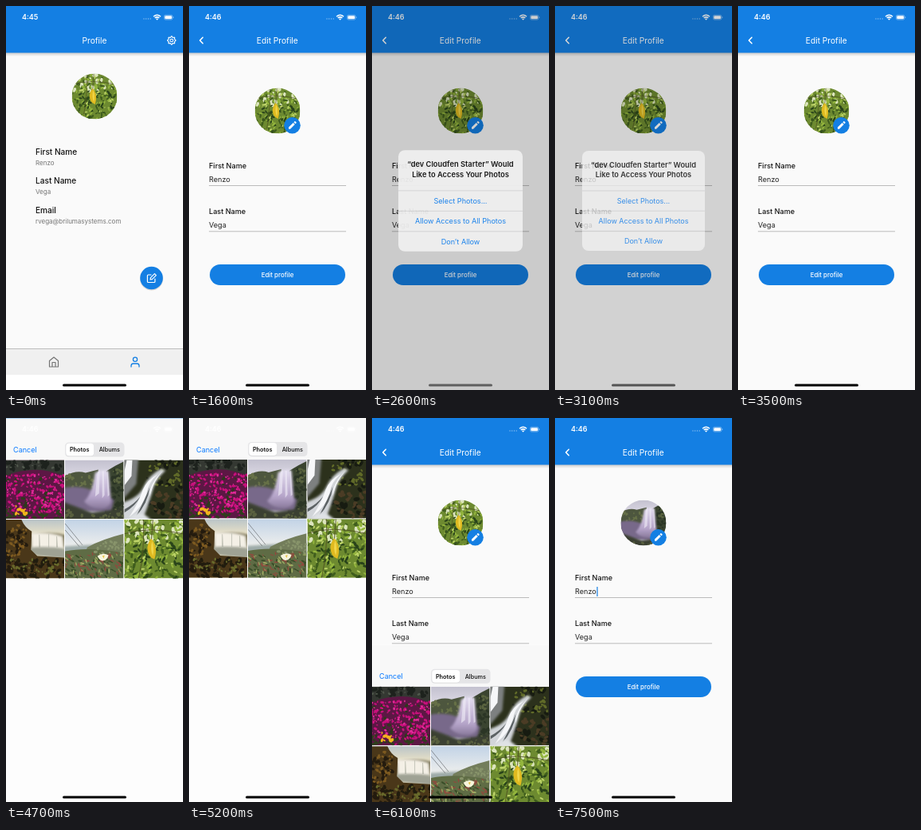
Write an HTML page that moves like this. It is 222 by 480 pixels and loops after 8000 ms.

```html
<!DOCTYPE html>
<html lang="en">
<head>
<meta charset="utf-8">
<title>Edit profile</title>
<style>
html, body { margin: 0; width: 100%; height: 100%; overflow: hidden; background: #fafafa; }
svg.stage { display: block; width: 100vw; height: 100vh; }
text { font-family: Inter, Roboto, "Open Sans", sans-serif; fill: #111; }
.mid { text-anchor: middle; }
.title { font-size: 10.2px; fill: #fff; }
.big { font-size: 10.1px; font-weight: 500; }
.sub { font-size: 8px; fill: #757575; }
.label { font-size: 9.1px; font-weight: 500; }
.value { font-size: 9.1px; fill: #222; }
.action { font-size: 7.9px; font-weight: 500; fill: #fff; }
.ask { font-size: 9.2px; font-weight: 600; }
.link { font-size: 9px; fill: #127fee; }
.tab { font-size: 7.3px; font-weight: 500; }
.line { fill: none; stroke: #fff; stroke-linecap: round; stroke-linejoin: round; }
</style>
</head>
<body>
<svg class="stage" viewBox="0 0 222 480">
  <defs>
    <linearGradient id="shade" x2="0" y2="1">
      <stop stop-color="#000" stop-opacity=".2"/><stop offset="1" stop-color="#000" stop-opacity="0"/>
    </linearGradient>
    <linearGradient id="skyGrey" x2="0" y2="1">
      <stop stop-color="#c3c1cf"/><stop offset=".25" stop-color="#d9d6e2"/>
    </linearGradient>
    <linearGradient id="skyGold" x2="0" y2="1">
      <stop stop-color="#b9c4c8"/><stop offset=".3" stop-color="#f1e6c6"/>
    </linearGradient>
    <linearGradient id="skyBlue" x2="0" y2="1">
      <stop stop-color="#c2d3e6"/><stop offset=".45" stop-color="#edeeed"/>
    </linearGradient>
    <linearGradient id="mist" x2="0" y2="1">
      <stop stop-color="#e4def0"/><stop offset=".7" stop-color="#b5a4c9"/><stop offset="1" stop-color="#8a7a9c"/>
    </linearGradient>
    <filter id="soft"><feGaussianBlur stdDeviation="1.4"/></filter>
    <clipPath id="round"><circle cx="28.5" cy="28.5" r="28.5"/></clipPath>
    <g id="photos"></g>
    <g id="bar">
      <rect width="222" height="480" fill="#fafafa"/>
      <rect y="58" width="222" height="5" fill="url(#shade)"/>
      <rect width="222" height="58.5" fill="#147fe3"/>
    </g>
  </defs>

  <g id="profile">
    <use href="#bar"/>
    <text class="title mid" x="111" y="46.5">Profile</text>
    <g class="line" transform="translate(207.7 43)" stroke-width="1.1">
      <path id="gear"/><circle r="1.8"/>
    </g>
    <g transform="translate(82.5 84.5)" clip-path="url(#round)"><use href="#leaves" width="57" height="57"/></g>
    <text class="big" x="37" y="185.5">First Name</text>
    <text class="sub" x="37" y="198.8">Renzo</text>
    <text class="big" x="37" y="222">Last Name</text>
    <text class="sub" x="37" y="235.3">Vega</text>
    <text class="big" x="37" y="258.5">Email</text>
    <text class="sub" x="37" y="271.8">rvega@brilumasystems.com</text>
    <circle cx="182.5" cy="341" r="14.5" fill="#000" opacity=".15"/>
    <circle cx="182.5" cy="340" r="14.3" fill="#147fe3"/>
    <path class="line" stroke-width="1.2" d="M182 336h-3.6q-1 0-1 1v7.5q0 1 1 1h7.5q1 0 1-1V341M181 342l.4-2.3 5-5 1.9 1.9-5 5z"/>
    <rect y="428" width="222" height="33" fill="#f0f0f0"/>
    <rect y="428" width="222" height="1" fill="#bdbdbd"/>
    <rect y="461" width="222" height="19" fill="#fff"/>
    <path class="line" style="stroke:#747474" stroke-width="1.2" d="M54.5 443.5l5.5-4.5 5.5 4.5v7.5h-11zM58 451v-5.5h4v5.5"/>
    <path class="line" style="stroke:#147fe3" stroke-width="1.3" d="M157 451v-1.2q0-2.8 2.8-2.8h4.4q2.8 0 2.8 2.8v1.2M159.4 441.8a2.6 2.6 0 1 0 5.2 0a2.6 2.6 0 1 0-5.2 0"/>
  </g>

  <g id="edit">
    <use href="#bar"/>
    <text class="title mid" x="110.8" y="46.5">Edit Profile</text>
    <path class="line" stroke-width="1.6" d="M17.3 39.3l-3.6 3.7 3.6 3.7"/>
    <g transform="translate(82.5 102.5)" clip-path="url(#round)"><use id="face" href="#leaves" width="57" height="57"/></g>
    <circle cx="129.5" cy="149.3" r="10.3" fill="#147fe3"/>
    <path fill="#fff" d="M125 153.7v-2.1l5.7-5.7 2.1 2.1-5.7 5.7zM131.4 145.2l1-1q.5-.4 1 0l1.1 1.1q.4.5 0 1l-1 1z"/>
    <text class="label" x="25" y="203.2">First Name</text>
    <text class="value" x="25" y="220.3">Renzo</text>
    <rect id="caret" x="52.4" y="211" width="1.2" height="12" fill="#147fe3"/>
    <rect x="25" y="224" width="172" height="1" fill="#bcbcbc"/>
    <text class="label" x="25" y="260.3">Last Name</text>
    <text class="value" x="25" y="277.3">Vega</text>
    <rect x="25" y="281.3" width="172" height="1" fill="#bcbcbc"/>
    <rect x="26" y="323" width="170" height="26" rx="13" fill="#147fe3"/>
    <text class="action mid" x="111" y="338.8">Edit profile</text>
  </g>

  <g id="sheet">
    <rect width="222" height="480" fill="#fdfdfd"/>
    <rect width="222" height="52" fill="#f8f8f8"/>
    <text x="9" y="42.6" style="font-size:9.1px;fill:#0a7aff">Cancel</text>
    <rect x="74" y="30" width="74.5" height="18" rx="4.5" fill="#e5e5e7"/>
    <rect x="75.2" y="31.5" width="35" height="16" rx="4" fill="#000" opacity=".1"/>
    <rect x="75.2" y="31.1" width="35" height="15.8" rx="4" fill="#fff"/>
    <text class="tab mid" x="92.2" y="41.7" style="font-weight:600">Photos</text>
    <text class="tab mid" x="129.8" y="41.7">Albums</text>
    <g id="grid"></g>
  </g>

  <g id="status">
    <text id="clock" x="20" y="17.3" style="font-size:9px;font-weight:600;fill:#fff"></text>
    <path class="line" stroke-width="1.3" stroke-dasharray="0 2.7" opacity=".55" d="M173 16h8.2"/>
    <path class="line" stroke-width="1.5" style="stroke-linecap:butt" d="M185 13.2q4.5-3.9 9 0M186.7 15q2.8-2.3 5.6 0"/>
    <path fill="#fff" d="M187.9 16.1q1.6-1.2 3.2 0l-1.6 1.7z"/>
    <rect x="198.4" y="11.3" width="10.4" height="5.8" rx="1.7" fill="none" stroke="#fff" stroke-width=".6" opacity=".6"/>
    <rect x="199.3" y="12.2" width="8.6" height="4" rx="1" fill="#fff"/>
    <rect x="209.4" y="13.2" width=".8" height="2" rx=".4" fill="#fff" opacity=".6"/>
  </g>

  <rect id="dim" width="222" height="480"/>
  <g id="alert">
    <rect x="34" y="181" width="154" height="125" rx="8" fill="#f0f0f0"/>
    <text class="ask mid" x="111" y="202">“dev Cloudfen Starter” Would</text>
    <text class="ask mid" x="111" y="214.3">Like to Access Your Photos</text>
    <path d="M34 231h154M34 256.2h154M34 281.4h154" stroke="#3c3c43" stroke-opacity=".25" stroke-width=".6"/>
    <text class="link mid" x="111" y="246.8">Select Photos...</text>
    <text class="link mid" x="111" y="271.9">Allow Access to All Photos</text>
    <text class="link mid" x="111" y="297.2">Don’t Allow</text>
  </g>
  <rect id="home" x="71" y="472.5" width="80" height="3" rx="1.5"/>
</svg>

<script>
const $ = id => document.getElementById(id);
const LOOP = 8000, STEP = 100;

let seed = 7;
const rnd = (a, b) => {
  seed = (seed * 16807) % 2147483647;
  return a + (b - a) * seed / 2147483647;
};

const shape = (fill, d, extra = '') => `<path fill="${fill}" d="${d}" ${extra}/>`;
const soft = (fill, d) => shape(fill, d, 'filter="url(#soft)"');
const base = fill => `<rect width="74" height="74" fill="${fill}"/>`;

// Scattered ovals in one colour, inside a box
function specks(fill, n, x0, y0, x1, y1, size, flat = 0.6, turn = 180) {
  let d = '';
  for (let i = 0; i < n; i++) {
    const a = rnd(size * 0.4, size), b = a * flat, rot = rnd(0, turn);
    const dx = 2 * a * Math.cos(rot * Math.PI / 180), dy = 2 * a * Math.sin(rot * Math.PI / 180);
    const arc = s => `a${a.toFixed(1)} ${b.toFixed(1)} ${rot.toFixed(0)} 1 0 ${(s * dx).toFixed(2)} ${(s * dy).toFixed(2)}`;
    d += `M${(rnd(x0, x1) - dx / 2).toFixed(1)} ${(rnd(y0, y1) - dy / 2).toFixed(1)}${arc(1)}${arc(-1)}`;
  }
  return shape(fill, d);
}

const photos = {
  flowers: base('#5c1744')
    + shape('#343832', 'M0 0H74V20Q50 10 28 13Q12 14 0 20z')
    + specks('#1d221d', 26, 0, 0, 74, 13, 4)
    + specks('#525a4e', 12, 0, 0, 60, 10, 2)
    + specks('#2d3a1c', 50, 0, 18, 74, 74, 3)
    + specks('#c8107c', 130, 0, 18, 74, 66, 2.6)
    + specks('#e32b9b', 80, 0, 18, 74, 64, 1.8)
    + specks('#2f3d1d', 26, 0, 62, 74, 74, 3)
    + specks('#c8107c', 14, 26, 60, 74, 74, 2.2)
    + specks('#f2b21d', 9, 12, 58, 27, 68, 3.2),

  falls: base('url(#skyGrey)')
    + shape('#4d563e', 'M0 20Q14 12 26 16L42 12V50H0z')
    + shape('#3a4430', 'M52 14L64 7 74 2V74H50z')
    + specks('#667047', 24, 0, 19, 36, 34, 3)
    + specks('#2b3525', 30, 58, 12, 74, 64, 4)
    + specks('#59633f', 14, 60, 10, 74, 30, 2.5)
    + soft('#78698a', 'M-4 36Q18 30 38 40L62 50 58 66 20 64-4 56z')
    + soft('url(#mist)', 'M38 16Q47 11 55 14L58 48Q60 58 48 61Q32 62 24 52Q34 44 38 16z')
    + shape('#f2eef8', 'M41 15l3-1-1 28-5 4zM47 14h2l1 30-3 4zM53 14h1l2 30-2 2z', 'opacity=".6"')
    + soft('#3a4130', 'M-4 52Q18 60 34 66L78 60V78H-4z')
    + specks('#59603f', 22, 0, 62, 74, 74, 3),

  stream: base('#2c311c')
    + soft('#7d8080', 'M-4-4H18L15 30-4 52z')
    + specks('#171b11', 30, 26, 0, 74, 74, 5)
    + specks('#606a28', 30, 32, 2, 74, 34, 3)
    + specks('#4b3c25', 26, 36, 40, 74, 74, 4)
    + soft('#d2d5d9', 'M52 13Q40 24 37 34Q32 52 22 78H-4V54Q18 48 24 34Q30 20 46 11z')
    + shape('#f6f7f9', 'M42 18Q30 28 28 42Q24 58 6 72Q19 52 23 38Q28 25 42 18zM3 0H10L9 20 0 32V14zM48 14Q38 26 35 36L32 46Q31 30 48 14z')
    + shape('#5c6264', 'M32 34Q30 54 14 72Q26 50 32 34zM20 46Q14 58 0 66V62Q12 56 20 46z')
    + soft('#dfe2e5', 'M2 78Q18 56 36 78z'),

  cove: base('url(#skyGold)')
    + soft('#706a4f', 'M30 20Q54 14 78 20V36H30z')
    + soft('#f4f0e6', 'M32 17Q54 15 72 21L74 38H33z')
    + shape('#c4c3b8', 'M42 19h1l1 16h-2zM54 18h1v17h-1zM64 21h1l1 14h-2z')
    + soft('#9fa294', 'M28 36Q50 33 78 37V50Q50 47 28 44z')
    + shape('#4a3719', 'M0 0H20Q24 10 33 15L32 38 40 46 74 48V74H0z')
    + specks('#241b0e', 40, 0, 5, 26, 74, 4)
    + specks('#7d5a20', 32, 0, 5, 26, 46, 2.5)
    + specks('#211c0e', 46, 16, 50, 74, 74, 4)
    + specks('#686a2b', 34, 4, 50, 70, 72, 2.2),

  coast: base('url(#skyBlue)')
    + soft('#9daaa8', 'M-4 34L78 29V46H-4z')
    + shape('#737d5b', 'M28 35Q46 25 74 18V48H24z')
    + shape('#5f6c45', 'M0 40Q30 34 74 42V74H0z')
    + '<path fill="none" stroke="#55585c" stroke-width=".6" d="M0 5L22 32M0 13L18 34"/>'
    + specks('#87936a', 26, 38, 28, 74, 44, 2.5)
    + specks('#394d28', 46, 0, 46, 74, 74, 4, 0.3, 90)
    + specks('#91493d', 46, 0, 42, 74, 72, 3.5, 0.25, 100)
    + specks('#9eab63', 40, 0, 44, 74, 74, 3, 0.3, 100)
    + shape('#f7f5dc', 'M41 46Q48 41 55 45Q53 52 47 52Q43 51 41 46z')
    + shape('#e5c348', 'M47 46l3-1-1 4z'),

  leaves: base('#6d8a30')
    + specks('#dce5bd', 26, 0, 0, 74, 30, 5)
    + specks('#3f5d1d', 70, 0, 4, 74, 74, 4.5, 0.4)
    + specks('#93b53d', 60, 0, 0, 74, 74, 4.5, 0.4)
    + specks('#29431a', 44, 8, 28, 74, 74, 4, 0.4)
    + specks('#bdd368', 36, 0, 2, 74, 70, 3, 0.4)
    + '<path fill="none" stroke="#4b4a20" stroke-width=".8" d="M24 0Q26 38 18 74M36 0L34 27M0 18Q30 8 74 18"/>'
    + shape('#e0ba20', 'M34 24Q43 34 38 50Q29 47 29 35Q30 28 34 24z')
    + shape('#f0d64a', 'M35 27Q38 36 36 46Q32 38 35 27z')
};

$('photos').innerHTML = Object.entries(photos)
  .map(([id, art]) => `<symbol id="${id}" viewBox="0 0 74 74">${art}</symbol>`).join('');
$('grid').innerHTML = Object.keys(photos)
  .map((id, i) => `<use href="#${id}" x="${i % 3 * 74.5 - 0.5}" y="${52 + Math.floor(i / 3) * 74.3}" width="73.5" height="73.5"/>`).join('');

let teeth = '';
for (let i = 0; i < 32; i++) {
  const a = (i - 0.5) * Math.PI / 16, r = i % 4 < 2 ? 5.1 : 4;
  teeth += `${i ? 'L' : 'M'}${(r * Math.cos(a)).toFixed(2)} ${(r * Math.sin(a)).toFixed(2)}`;
}
$('gear').setAttribute('d', teeth + 'z');

const clamp = x => Math.min(1, Math.max(0, x));
const easeOut = x => 1 - (1 - clamp(x)) ** 3;
// Critically damped spring from 0 to 1
const spring = (ms, w) => {
  const s = Math.max(0, ms / 1000) * w;
  return 1 - (1 + s) * Math.exp(-s);
};
const set = (id, name, value) => $(id).setAttribute(name, value);
const show = (id, on) => set(id, 'visibility', on ? 'visible' : 'hidden');

function draw(t) {
  const push = easeOut((t - 480) / 400);
  set('profile', 'transform', `translate(${-74 * push} 0)`);
  set('edit', 'transform', `translate(${222 * (1 - push)} 0)`);
  show('profile', push < 1);
  show('edit', push > 0);

  let alert = 0, scale = 1;
  if (t < 2990) {
    alert = t < 2800 ? spring(t - 2150, 10) : 1;
    scale = 1.2 - 0.2 * alert;
  } else if (t < 3500) {
    alert = 1 - spring(t - 3003, 8.5);
  }
  set('dim', 'opacity', 0.2 * alert);
  set('alert', 'opacity', alert);
  set('alert', 'transform', `translate(111 243.5) scale(${scale}) translate(-111 -243.5)`);
  set('home', 'fill-opacity', 1 - 0.5 * alert);

  const up = spring(t - 4207, 18.26), down = spring(t - 5991, 18.26);
  set('sheet', 'transform', `translate(0 ${480 * (1 - up + down)})`);
  show('sheet', t > 4207 && t < 6500);

  $('clock').textContent = t < 1600 ? '4:45' : '4:46';
  set('face', 'href', t < 7400 ? '#leaves' : '#falls');
  set('caret', 'opacity', clamp((t - 7300) / 200));
}

const start = performance.now();
function tick() {
  const t = (performance.now() - start) % LOOP;
  draw(Math.floor(t / STEP) * STEP);
  requestAnimationFrame(tick);
}
tick();
</script>
</body>
</html>
```
